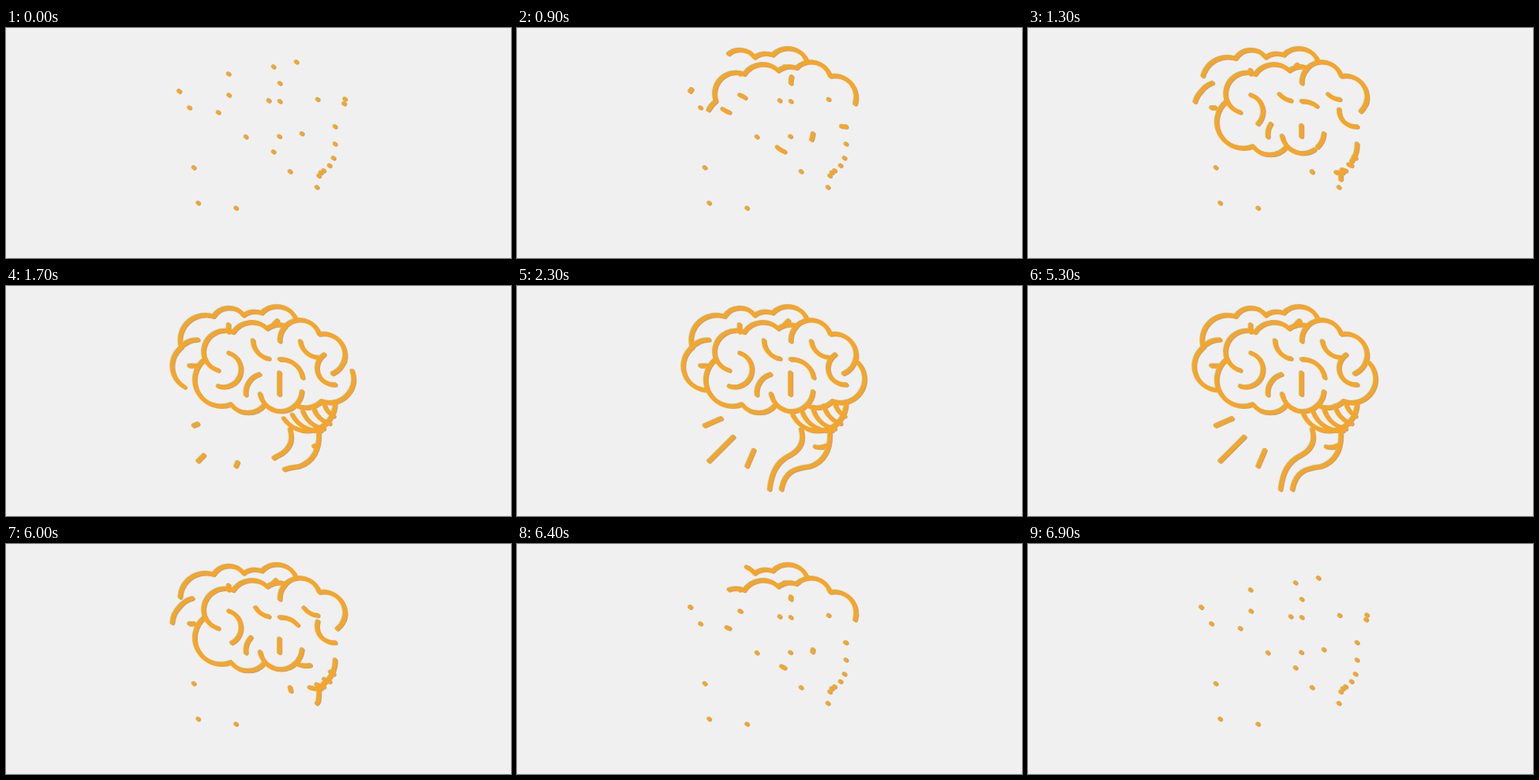
Write an HTML page that moves like this. It is 640 px wide and 292 px high and loops after 7000 ms.

```html
<!DOCTYPE html>
<html lang="en">
<head>
<meta charset="utf-8">
<title>Brain line drawing</title>
<style>
  html, body { margin: 0; width: 100%; height: 100%; overflow: hidden; background: #f0f0f0; }
  svg { display: block; width: 100vw; height: 100vh; }
  use { fill: none; stroke-width: 5.2; stroke-linecap: round; stroke-linejoin: round; }
  .shade { stroke: #aaa9a8; }
  .light { stroke: #ffc31f; }
  .line { stroke: #f5a52d; }
</style>
</head>
<body>
<svg viewBox="0 0 640 292">
  <defs><g id="art"></g></defs>
  <use class="shade" href="#art" x="1.2" y="1.1"/>
  <use class="light" href="#art" x="-0.8" y="-0.3"/>
  <use class="line" href="#art"/>
</svg>
<script>
const LOOP = 7000, REWIND = 5300, DRAWN = 2420, REWIND_SPEED = 1.5;

// Each group: start and duration in ms, then the strokes it draws.
const groups = [
  // front outline
  [0, 1870, 'M428.5 96A27.5 27.5 0 0 0 397 61A26 26 0 0 0 354 50.5A25 25 0 0 0 331 54A28 28 0 0 0 288 58.5' +
    'A27 27 0 0 0 252 92.5A33.5 33.5 0 0 0 285 150A27 27 0 0 0 328 150A27 27 0 0 0 367 151' +
    'A28 28 0 0 0 400 146A30 30 0 0 0 432 97'],
  // back outline
  [0, 1600, 'M368 43A26.5 26.5 0 0 0 324 34A25 25 0 0 0 301 37A23 23 0 0 0 263 38.5A32 32 0 0 0 222 78'],
  // short ends that meet the outline
  [600, 700,
    'M269 107A27 27 0 0 1 252 92',
    'M375 134A27 27 0 0 1 367 151',
    'M339 157A27 27 0 0 1 322 137',
    'M347 70A26 26 0 0 1 354 51'],
  // long folds
  [700, 1000,
    'M429.5 90A27 27 0 0 1 414 111',
    'M219.5 80A29 29 0 0 1 243 68',
    'M282.5 85A22 22 0 0 1 269 127',
    'M417 125A21 21 0 0 1 403 87'],
  // small folds
  [900, 800,
    'M333 92A24 24 0 0 1 313 69',
    'M347 93A28 28 0 0 1 376 116',
    'M395 90.5A24 24 0 0 1 373 70',
    'M304 138A24 24 0 0 1 321 112',
    'M346.5 137.5V110',
    'M232.5 101H242',
    'M282 58V49',
    'M339 49L344 44'],
  [1000, 1000, 'M219.5 80A30.5 30.5 0 0 0 241 132'],
  // cerebellum
  [1050, 800, 'M417 147A35.5 35.5 0 0 1 348 160'],
  [1100, 750, 'M399 183.5A37 37 0 0 1 361 159'],
  [1150, 700,
    'M415 165A26 26 0 0 1 403 149',
    'M410 174.5A31 31 0 0 1 389 152',
    'M402.5 181A34 34 0 0 1 375 155'],
  // stem
  [1200, 800, 'M396.5 187.5C397 206 390 223 371 229C352 231 339 235 335 258'],
  [1250, 900, 'M360 182C364 196 360 207 346 214.5C328 223 322 239 320 258'],
  // tick and rays
  [1450, 800,
    'M394 202Q386 206 378 204',
    'M238 177L258.5 168',
    'M243.5 222L274 191.5',
    'M291.5 228.5L300 208.5']
];

const art = document.getElementById('art');
const strokes = groups.flatMap(([start, span, ...paths]) => paths.map(d => {
  const el = document.createElementNS('http://www.w3.org/2000/svg', 'path');
  el.setAttribute('d', d);
  el.setAttribute('pathLength', 1);
  art.append(el);
  return { el, start, span };
}));

const clamp = x => Math.min(1, Math.max(0, x));
const ease = x => x * x * (3 - 2 * x);

function draw(now) {
  const t = now % LOOP;
  const head = t < REWIND ? Math.min(t, DRAWN) : DRAWN - (t - REWIND) * REWIND_SPEED;
  for (const { el, start, span } of strokes) {
    const part = ease(clamp((head - start) / span));
    el.setAttribute('stroke-dasharray', part >= 1 ? 'none' : `${Math.max(part, 0.0005)} 3`);
  }
}

const began = performance.now();
function tick() {
  draw(performance.now() - began);
  requestAnimationFrame(tick);
}
tick();
</script>
</body>
</html>
```
